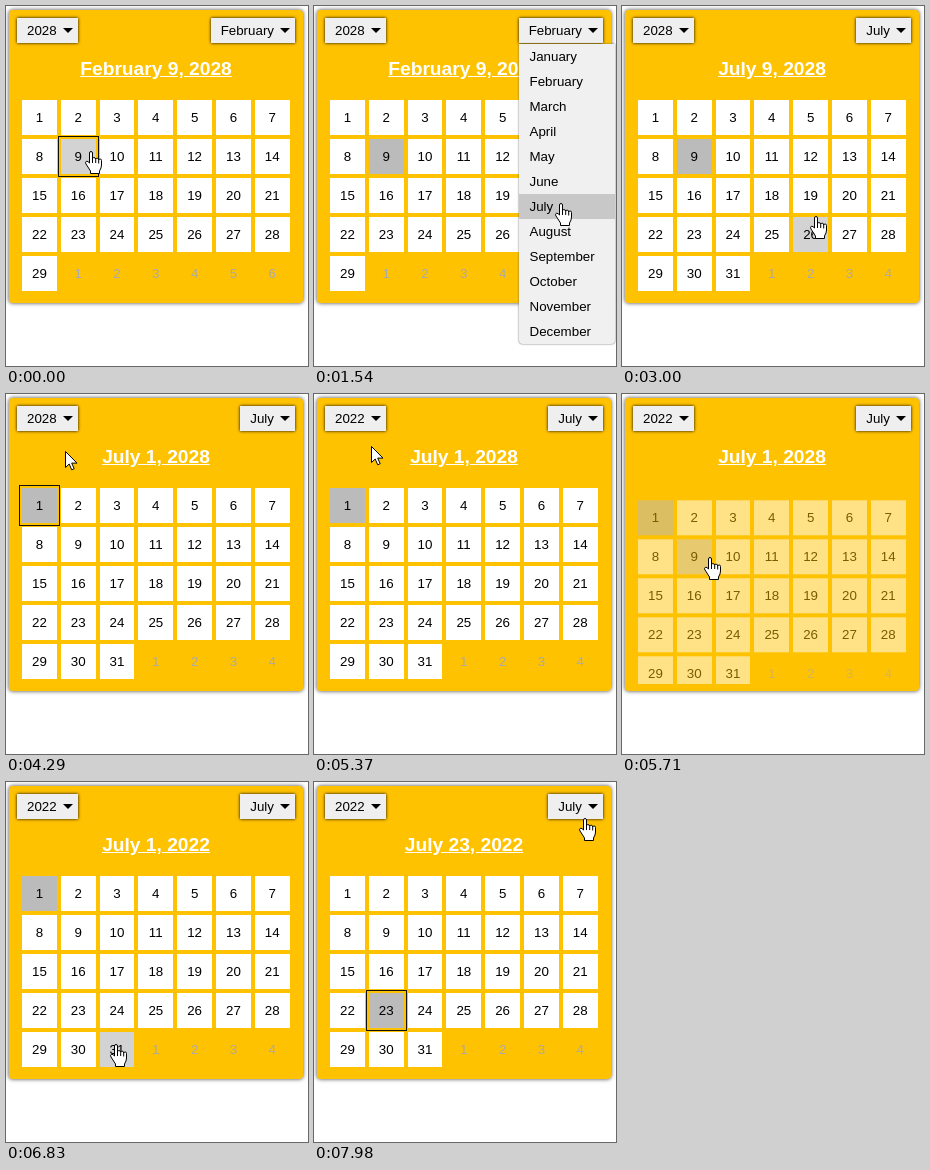
An HTML page that plays this animation: 302x360 px, repeating every 8000 ms.

```html
<!DOCTYPE html>
<html lang="en">
<head>
<meta charset="utf-8">
<title>Calendar</title>
<style>
html, body { margin: 0; width: 100%; height: 100%; overflow: hidden; background: #fff; }
body { position: relative; font: 13.333px/25px Arial, "Liberation Sans", sans-serif; color: #000; cursor: default; }
div, svg { position: absolute; box-sizing: border-box; white-space: nowrap; }
#card { left: 3px; top: 4px; width: 294px; height: 293px; border-radius: 4px; background: #ffc200; box-shadow: 0 0 4px #444; }
.select { top: 12px; height: 25px; padding: 0 21px 0 10px; background: #efefef; box-shadow: 0 0 3px #000; }
.select::after { content: ""; position: absolute; right: 5px; top: 10px; border: 5px solid transparent; border-top-color: #000; border-bottom: 0; }
#year { left: 11px; }
#month { right: 13px; }
#title { left: 0; width: 300px; top: 50px; text-align: center; font-size: 19.2px; font-weight: bold; color: #fff; text-decoration: underline; }
#clip { left: 0; top: 88px; width: 302px; height: 202px; overflow: hidden; }
#days { left: 0; top: 6px; width: 302px; height: 200px; }
.day { width: 34.8px; height: 35px; line-height: 35px; text-align: center; background: #fff; }
.day.selected { background: #bbb; }
.day.hover { background: #d3d3d3; }
.day.next { background: none; color: #aaa; }
.day.focus { outline: 1px solid #101010; outline-offset: 2px; }
.list { top: 38px; border-radius: 0 0 4px 4px; background: #f0f0f0; box-shadow: 0 0 2px #555; overflow: hidden; }
.list div { position: static; height: 25px; padding-left: 10.5px; }
.list .on { background: #c8c8c8; }
#months { left: 205px; width: 96px; }
#years { left: 11px; width: 60px; }
#cursor { left: 0; top: 0; width: 20px; height: 26px; overflow: visible; }
#cursor path { fill: #fff; stroke: #000; stroke-linejoin: round; }
</style>
</head>
<body>
<div id="card"></div>
<div id="year" class="select"></div>
<div id="month" class="select"></div>
<div id="title"></div>
<div id="clip"><div id="days"></div></div>
<div id="months" class="list"></div>
<div id="years" class="list"></div>
<svg id="cursor">
  <path id="arrow" d="M.5 .5V16.5L4.2 13L6.7 18.8L9.2 17.7L6.7 12.1H12Z"/>
  <path id="hand" transform="translate(-6)" d="M6 .5Q4.5 .5 4.5 2V12L3 10.6Q1.7 9.8 .8 10.8Q.2 11.6 1 13L5.5 20V22.5H14.5V20Q16.5 17 16.5 14V9.5Q16.5 8 15.2 8Q14 8 13.7 9Q13.7 7.2 12.2 7.2Q11 7.2 10.7 8.2Q10.6 6.6 9 6.6Q8 6.6 7.5 7.3V2Q7.5 .5 6 .5ZM7.5 7V12M10.7 8.2V12M13.7 9V12.5"/>
</svg>
<script>
const LOOP = 8000, HOVER_LAG = 70;
const MONTH_OPEN = 710, MONTH_PICK = 2040, YEAR_OPEN = 4650, YEAR_PICK = 5370;
const CLICK_1 = 3950, CLICK_23 = 7150;
const OUT_AT = 100, OUT_MS = 500, IN_AT = OUT_AT + OUT_MS, IN_MS = 320, DONE = IN_AT + IN_MS;
const COLS = 7, ROWS = 5, LEFT = 16, TOP = 94, STEP_X = 38.8, STEP_Y = 39, CELL_W = 34.8, CELL_H = 35;

// Pointer stops: x, y, arrival time, rest
const stops = [
  [85, 145, 0, 60],       // day 9
  [272, 23, 560, 200],    // month select
  [247, 197, 1500, 540],  // July
  [187, 242, 2400, 0],
  [189, 229, 2530, 0],
  [197, 196, 3390, 150],
  [38, 110, 3840, 170],   // day 1
  [59, 57, 4290, 60],
  [62, 21, 4550, 130],    // year select
  [57, 52, 4940, 430],    // 2022
  [88, 163, 5710, 0],
  [173, 234, 6110, 0],
  [112, 264, 6570, 210],
  [73, 222, 7140, 350],   // day 23
  [271, 36, 7970, 30]     // month select
];

const $ = id => document.getElementById(id);
const add = (parent, text = "") => {
  const el = document.createElement("div");
  el.textContent = text;
  return parent.appendChild(el);
};
const smooth = u => u * u * (3 - 2 * u);

const monthNames = ["January", "February", "March", "April", "May", "June", "July",
  "August", "September", "October", "November", "December"];
const monthRows = monthNames.map(name => add($("months"), name));
const yearRows = Array.from({ length: 10 }, (_, i) => add($("years"), 2022 + i));
const cells = Array.from({ length: COLS * ROWS }, (_, i) => {
  const el = add($("days"));
  el.style.left = LEFT + STEP_X * (i % COLS) + "px";
  el.style.top = STEP_Y * Math.floor(i / COLS) + "px";
  return el;
});

function pointer(t) {
  const i = stops.findLastIndex(s => s[2] <= t);
  const [x, y, at, rest] = stops[i], next = stops[i + 1], leave = at + rest;
  if (!next || t <= leave) return [x, y];
  const u = smooth((t - leave) / (next[2] - leave));
  return [x + (next[0] - x) * u, y + (next[1] - y) * u];
}

// Days sink and fade out, then rise back with the new content
function fade(t) {
  const d = t - (t < YEAR_PICK ? MONTH_PICK : YEAR_PICK);
  if (d < OUT_AT || d >= DONE) return [1, 0];
  const leaving = d < IN_AT;
  const depth = leaving ? (d - OUT_AT) / OUT_MS : (DONE - d) / IN_MS;
  return [1 - smooth(depth), depth * (leaving ? 25.5 : 18)];
}

function dayAt([x, y], shift) {
  const u = (x - LEFT) / STEP_X, v = (y - TOP - shift) / STEP_Y;
  const col = Math.floor(u), row = Math.floor(v);
  const inside = u >= 0 && u < COLS && v >= 0 && v < ROWS &&
    (u - col) * STEP_X < CELL_W && (v - row) * STEP_Y < CELL_H;
  return inside ? row * COLS + col + 1 : 0;
}

function showList(list, rows, open, current, y) {
  list.style.display = open ? "" : "none";
  const over = Math.floor((y - 38) / 25);
  const on = over >= 0 ? over : current;
  rows.forEach((row, i) => row.className = i === on ? "on" : "");
}

function render(t) {
  const [x, y] = pointer(t);
  const [opacity, shift] = fade(t);
  const monthOpen = t >= MONTH_OPEN && t < MONTH_PICK;
  const yearOpen = t >= YEAR_OPEN && t < YEAR_PICK;
  const listOpen = monthOpen || yearOpen;
  const selected = t < CLICK_1 ? 9 : t < CLICK_23 ? 1 : 23;
  const focused = t < MONTH_OPEN || t >= CLICK_1 && t < YEAR_OPEN || t >= CLICK_23;
  const count = t < MONTH_PICK + IN_AT ? 29 : 31;
  const hover = listOpen ? 0 : dayAt(pointer(Math.max(0, t - HOVER_LAG)), shift);

  $("year").textContent = t < YEAR_PICK ? 2028 : 2022;
  $("month").textContent = t < MONTH_PICK ? "February" : "July";
  $("title").textContent = `${t < MONTH_PICK + DONE ? "February" : "July"} ${selected}, ` +
    (t < YEAR_PICK + DONE ? 2028 : 2022);

  $("days").style.opacity = opacity;
  $("days").style.transform = `translateY(${shift}px)`;
  cells.forEach((el, i) => {
    const n = i + 1, next = n > count;
    el.textContent = next ? n - count : n;
    el.className = "day" + (next ? " next" :
      (n === selected ? " selected" + (focused ? " focus" : "") : "") + (n === hover ? " hover" : ""));
  });

  showList($("months"), monthRows, monthOpen, 1, y);
  showList($("years"), yearRows, yearOpen, 6, y);

  const onSelect = y >= 11 && y < 38 && (x < 72 || x >= (t < MONTH_PICK ? 204 : 234));
  const hand = onSelect || listOpen || hover > 0 && hover <= count;
  $("hand").style.display = hand ? "" : "none";
  $("arrow").style.display = hand ? "none" : "";
  $("cursor").style.transform = `translate(${Math.round(x)}px, ${Math.round(y)}px)`;
}

const start = performance.now();
function tick() {
  render(Math.max(0, performance.now() - start) % LOOP);
  requestAnimationFrame(tick);
}
tick();
</script>
</body>
</html>
```
